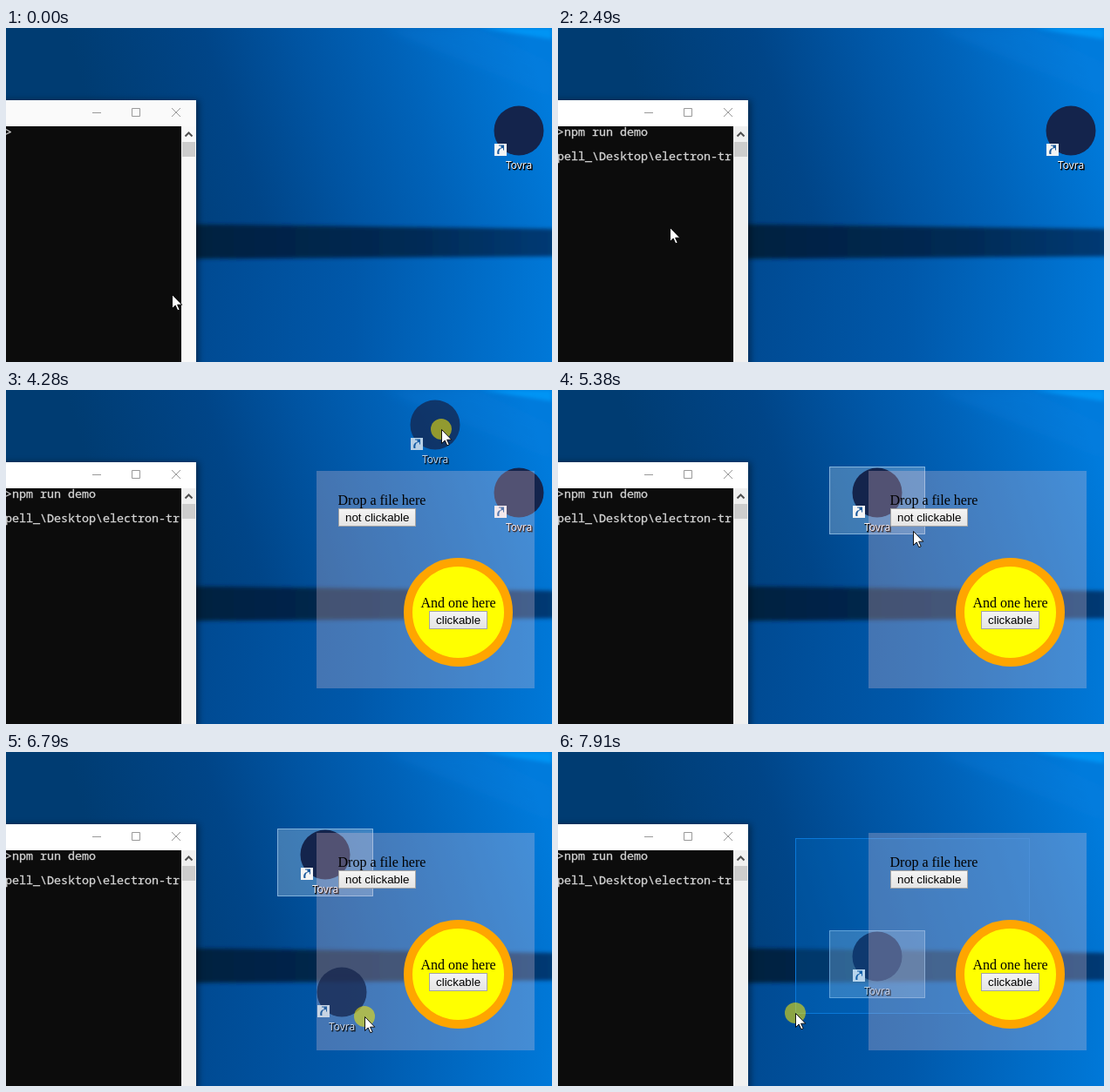
Animation of 626x384 px, one loop 8000 ms. Source, as an HTML page:

```html
<!DOCTYPE html>
<html lang="en">
<head>
<meta charset="utf-8">
<title>Click-through window demo</title>
<style>
  html, body { margin: 0; width: 100%; height: 100%; overflow: hidden; background: #0060b4; }
  svg { display: block; }
  .label { font: 12px "Open Sans", sans-serif; fill: #fff; text-anchor: middle; }
  .label.dark { fill: #000; stroke: #000; stroke-width: .8px; }
  .serif { font: 16px "Liberation Serif", serif; }
  .button { font: 13.333px "Liberation Sans", sans-serif; }
  .console { font: 13.333px "Noto Sans Mono", monospace; fill: #d4d4d4; stroke: #d4d4d4; stroke-width: .3px; white-space: pre; }
</style>
</head>
<body>
<svg width="626" height="384" viewBox="0 0 626 384">
  <defs>
    <linearGradient id="sky" gradientUnits="userSpaceOnUse" x1="120" y1="170" x2="600" y2="20">
      <stop offset="0" stop-color="#003c72"/>
      <stop offset=".3" stop-color="#004588"/>
      <stop offset=".5" stop-color="#0054a2"/>
      <stop offset=".7" stop-color="#0062b8"/>
      <stop offset="1" stop-color="#007bdc"/>
    </linearGradient>
    <linearGradient id="floor" gradientUnits="userSpaceOnUse" x1="218" y1="290" x2="626" y2="300">
      <stop offset="0" stop-color="#004a92"/>
      <stop offset=".45" stop-color="#0058aa"/>
      <stop offset="1" stop-color="#0078d8"/>
    </linearGradient>
    <linearGradient id="bar" gradientUnits="userSpaceOnUse" x1="218" y1="0" x2="626" y2="0">
      <stop offset="0" stop-color="#002040"/>
      <stop offset=".6" stop-color="#002a54"/>
      <stop offset="1" stop-color="#003a74"/>
    </linearGradient>
    <linearGradient id="face" x1="0" y1="0" x2="0" y2="1">
      <stop offset="0" stop-color="#f4f4f4"/>
      <stop offset="1" stop-color="#e4e4e4"/>
    </linearGradient>
    <filter id="soft" x="-20%" y="-20%" width="140%" height="140%"><feGaussianBlur stdDeviation="6"/></filter>
    <filter id="edge" x="-5%" y="-30%" width="110%" height="160%"><feGaussianBlur stdDeviation="2"/></filter>
    <filter id="shade" x="-10%" y="-10%" width="120%" height="120%"><feGaussianBlur stdDeviation="3.5"/></filter>
    <g id="app">
      <circle r="28.5" fill="#14244c"/>
      <rect x="-28" y="15" width="14" height="14" fill="#f4f4f4"/>
      <path d="M-24.5 27c-1-4 1-7 4-7v-2.500h-2.500v-1h6v6h-1v-2.500c-4 0-5 3-4.500 7z" fill="#1c5a9c"/>
      <text class="label dark" x="1" y="45">Tovra</text>
      <text class="label" y="44">Tovra</text>
    </g>
  </defs>

  <g id="wallpaper">
    <rect width="626" height="384" fill="url(#sky)"/>
    <path d="M430 0H540L626 40V80Z" fill="#0a80e0" opacity=".25" filter="url(#soft)"/>
    <path d="M545 0H626V13Z" fill="#0094f4" filter="url(#edge)"/>
    <rect y="250" width="626" height="134" fill="url(#floor)"/>
    <path d="M200 225.500L640 231V262.500L200 265.500Z" fill="url(#bar)" filter="url(#edge)"/>
  </g>

  <g id="icon">
    <rect id="glow" x="-54.500" y="-29.500" width="109" height="77" fill="#cfe0f0" fill-opacity=".3" stroke="#a4cdee" stroke-opacity=".75"/>
    <use href="#app"/>
  </g>
  <rect id="marquee" fill="#0078d7" fill-opacity=".25" stroke="#0a78d8"/>

  <g id="overlay">
    <rect x="356" y="93" width="250" height="250" fill="#f4c8d8" fill-opacity=".28"/>
    <text class="serif" x="380.500" y="132">Drop a file here</text>
    <rect x="381.500" y="136.500" width="88" height="20" fill="url(#face)" stroke="#a4a4a4"/>
    <text class="button" x="389" y="151">not clickable</text>
    <circle cx="518.500" cy="255.500" r="57.500" fill="#ff0" stroke="#ffa500" stroke-width="10"/>
    <text class="serif" x="518.500" y="250" text-anchor="middle">And one here</text>
    <rect x="485.500" y="254.500" width="66" height="20" fill="url(#face)" stroke="#a4a4a4"/>
    <text class="button" x="493" y="269">clickable</text>
  </g>

  <g id="window">
    <rect id="shadow" x="-20" y="83" width="241" height="320" filter="url(#shade)"/>
    <rect id="frame" y="83" width="218" height="301"/>
    <rect y="113" width="201" height="271" fill="#0c0c0c"/>
    <rect id="track" x="201" y="113" width="17" height="271"/>
    <path d="M205.500 124.500L209.500 120.500L213.500 124.500" fill="none" stroke="#505050" stroke-width="2"/>
    <rect x="202" y="131" width="15" height="17" fill="#cdcdcd"/>
    <path id="controls" d="M99 97.500h10M144.500 92.500h9v9h-9zM190 92l10 10M200 92l-10 10" fill="none"/>
    <text class="console" x="-1" y="124">&gt;</text>
    <text class="console" id="command" x="7" y="124">npm run demo</text>
    <rect id="caret" x="103" y="124" width="8" height="2" fill="#ccc"/>
    <text class="console" id="path" x="-1" y="152">pell_\Desktop\electron-tr</text>
  </g>

  <use id="ghost" href="#app" opacity=".75"/>
  <circle id="press" r="12" fill="#ffec00" fill-opacity=".55"/>
  <path id="pointer" d="M-.5 -.5V15.500L3.200 12L5.800 17.800L8.200 16.800L5.600 11.200H10.800Z" fill="#fff" stroke="#000" stroke-width=".9"/>
</svg>

<script>
const LOOP = 8000;
const FRAME = 110;
const $ = id => document.getElementById(id);

const glide = (from, to, x, y, bow = 0) => ({ from, to, x, y, bow });
const home = { x: 191, y: 307 };
const glides = [
  glide(100, 310, 88, 254),
  glide(1410, 1730, 129, 230),
  glide(3150, 3600, 609, 156),
  glide(3720, 3820, 596, 124),
  glide(4160, 4280, 500, 46),
  glide(4710, 4820, 500, 24),
  glide(4930, 5260, 408, 163),
  glide(5480, 5910, 484, 160),
  glide(6020, 6130, 393, 147),
  glide(6250, 6470, 390, 289, -35),
  glide(6690, 6790, 412, 305),
  glide(6910, 7350, 541, 99),
  glide(7460, 7910, 273, 301)
];
const drags = [
  { press: 4040, drop: 4380 },
  { press: 4820, drop: 5380 },
  { press: 6130, drop: 6910 }
];
const selectAt = 7460;

const within = (t, from, to) => t >= from && t < to;
const smooth = p => p * p * (3 - 2 * p);

function pointerAt(t) {
  let { x, y } = home;
  for (const g of glides) {
    if (t < g.from) break;
    const steps = Math.round((g.to - g.from) / FRAME) + 1;
    const gap = (g.to - g.from) / (steps - 1);
    const done = Math.min(steps, Math.floor((t - g.from) / gap + .05) + 1);
    const p = done / steps, k = smooth(p);
    x += (g.x - x) * k + g.bow * Math.sin(Math.PI * p);
    y += (g.y - y) * k;
  }
  return { x: Math.round(x), y: Math.round(y) };
}

// desktop icons settle on a grid
const snap = ({ x, y }) => ({
  x: 588 + 111 * Math.round((x - 588) / 111),
  y: 118 + 117 * Math.round((y - 118) / 117)
});
const minus = (a, b) => ({ x: a.x - b.x, y: a.y - b.y });

function iconAt(t) {
  let icon = { x: 588, y: 118 }, ghost = null;
  for (const { press, drop } of drags) {
    if (t < press) break;
    const grab = minus(pointerAt(press), icon);
    const held = minus(pointerAt(Math.min(t, drop - 1)), grab);
    if (t >= drop) icon = snap(held);
    else if (held.x !== icon.x || held.y !== icon.y) ghost = held;
  }
  return { icon, ghost };
}

const show = (id, on) => $(id).setAttribute("visibility", on ? "visible" : "hidden");
const place = (id, { x, y }) => $(id).setAttribute("transform", `translate(${x} ${y})`);
const set = (id, attrs) => {
  for (const key in attrs) $(id).setAttribute(key, attrs[key]);
};

function drawWindow(t) {
  const active = within(t, 100, 2490);
  set("frame", { fill: t < 100 ? "#fafafa" : "#fff" });
  set("track", { fill: t < 100 ? "#f8f8f8" : "#f0f0f0" });
  set("controls", { stroke: active ? "#000" : "#999" });
  set("shadow", { opacity: active ? .6 : .4 });
  show("command", t >= 640);
  show("caret", within(t, 640, 740));
  show("path", t >= 1960);
}

function drawMarquee(t, pointer) {
  show("marquee", t >= selectAt);
  if (t < selectAt) return;
  const origin = pointerAt(selectAt - 1);
  const size = minus(pointer, origin);
  set("marquee", { x: pointer.x - .5, y: origin.y + .5, width: -size.x, height: Math.max(0, size.y - 1) });
}

function draw(t) {
  const pointer = pointerAt(t);
  const { icon, ghost } = iconAt(t);

  drawWindow(t);
  drawMarquee(t, pointer);
  show("overlay", t >= 3040);
  place("icon", icon);
  show("glow", t >= 3720 && !within(t, 4160, 4380));
  show("ghost", ghost);
  if (ghost) place("ghost", ghost);
  show("press", t >= selectAt || drags.some(d => within(t, d.press, d.drop)));
  place("press", { x: pointer.x - 1, y: pointer.y - 1 });
  place("pointer", pointer);
}

const start = performance.now();
function tick() {
  draw((performance.now() - start) % LOOP);
  requestAnimationFrame(tick);
}
tick();
</script>
</body>
</html>
```
